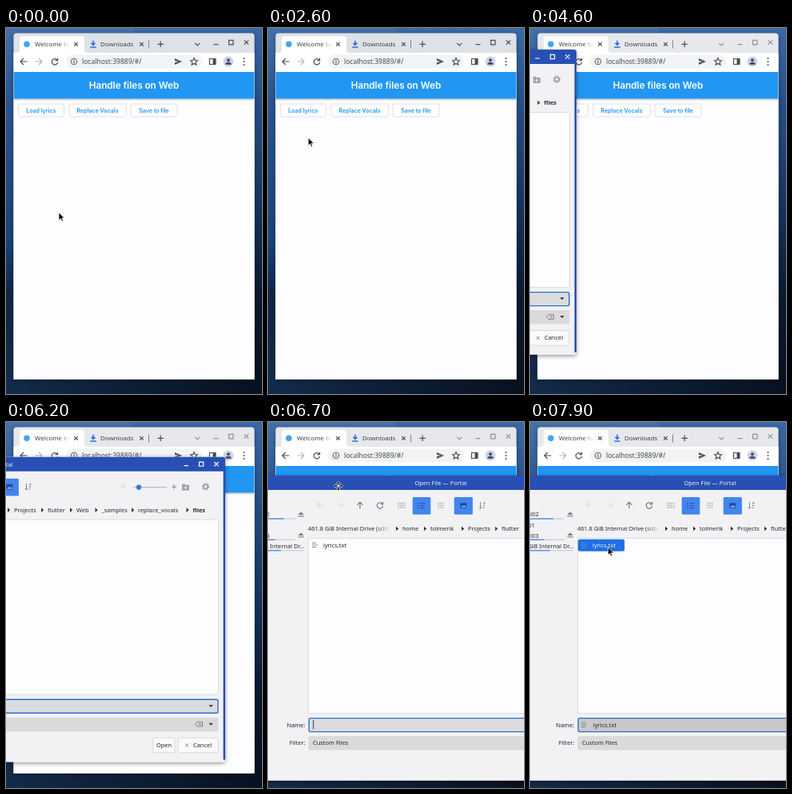
These frames come from a looping animation (320 by 458 pixels, 8000 ms). An HTML page:

```html
<!DOCTYPE html>
<html lang="en">
<head>
<meta charset="utf-8">
<title>Handle files on Web</title>
<style>
  html, body { margin: 0; width: 100%; height: 100%; overflow: hidden; background: #142c50; }
  svg { display: block; width: 100%; height: 100%; }
  text { font-family: "Noto Sans", sans-serif; font-size: 7.45px; fill: #26282c; white-space: pre; }
  .tab { font-size: 7.9px; fill: #3c4043; }
  .url { font-size: 8.5px; fill: #45494d; }
  .app { font-family: Inter, Roboto, sans-serif; text-anchor: middle; }
  .head { font-size: 11.7px; font-weight: 600; fill: #fff; }
  .btn { font-size: 7.05px; font-weight: 600; fill: #2196f3; }
  .end { text-anchor: end; }
  .mid { text-anchor: middle; }
  .line { fill: none; stroke: #4a4d52; stroke-width: 1.2; }
  .thin { fill: none; stroke: #77797d; stroke-width: .9; }
</style>
</head>
<body>
<svg id="stage" viewBox="0 0 320 458" preserveAspectRatio="none"></svg>
<script>
const LOOP = 8000, STEP = 100;

const rect = (x, y, w, h, fill, rx = 0, more = '') =>
  `<rect x="${x}" y="${y}" width="${w}" height="${h}" rx="${rx}" fill="${fill}" ${more}/>`;
const text = (x, y, s, cls = '', more = '') => `<text x="${x}" y="${y}" class="${cls}" ${more}>${s}</text>`;
const path = (d, cls = 'line', more = '') => `<path d="${d}" class="${cls}" ${more}/>`;
const solid = (d, fill) => `<path d="${d}" fill="${fill}"/>`;
const dot = (x, y, r, fill, more = '') => `<circle cx="${x}" cy="${y}" r="${r}" fill="${fill}" ${more}/>`;
const cross = (x, y, r) => `M${x - r} ${y - r}l${2 * r} ${2 * r}m0 ${-2 * r}l${-2 * r} ${2 * r}`;
const reload = (x, y) => `M${x + 3} ${y - 2}A3.7 3.7 0 1 0 ${x + 3.7} ${y + .8}M${x + 3.6} ${y - 4.3}v3h-3`;
const fade = (id, color) => `<linearGradient id="${id}"><stop stop-color="${color}" stop-opacity="0"/>
  <stop offset="1" stop-color="${color}"/></linearGradient>`;

const defs = `<defs>
  <linearGradient id="wallL" x2="0" y2="1">
    <stop stop-color="#4371a8"/><stop offset=".2" stop-color="#295590"/><stop offset=".6" stop-color="#1b437a"/>
    <stop offset=".76" stop-color="#0f2446"/><stop offset="1" stop-color="#132b4b"/>
  </linearGradient>
  <linearGradient id="wallR" x2="0" y2="1">
    <stop stop-color="#3a69a5"/><stop offset=".2" stop-color="#265088"/><stop offset=".5" stop-color="#16345f"/>
    <stop offset=".75" stop-color="#0b1a32"/><stop offset="1" stop-color="#081120"/>
  </linearGradient>
  <linearGradient id="wallB"><stop stop-color="#132b4b"/><stop offset="1" stop-color="#081120"/></linearGradient>
  ${fade('tabFade', '#fff')}${fade('crumbFade', '#f2f2f5')}
  <filter id="soft" x="-10%" y="-10%" width="120%" height="120%">
    <feDropShadow dx="0" dy="1.5" stdDeviation="2.5" flood-color="#000" flood-opacity=".45"/>
  </filter>
  <filter id="barSoft" x="-5%" y="-20%" width="110%" height="150%">
    <feDropShadow dx="0" dy="1" stdDeviation="1.1" flood-color="#000" flood-opacity=".4"/>
  </filter>
  <clipPath id="btnClip">${rect(15.5, 95, 57, 16, '#000', 2.5)}</clipPath>
  <clipPath id="page">${rect(9.5, 55, 301, 384.6, '#000')}</clipPath>
</defs>`;

const wall = rect(0, 0, 320, 458, 'url(#wallB)') + rect(0, 0, 160, 440, 'url(#wallL)') +
  rect(160, 0, 160, 440, 'url(#wallR)');

const button = (x, w, id = '') =>
  rect(x, 95, w, 16, '#fff', 2.5, `stroke="#dcdde2" stroke-width=".9" ${id && `id="${id}"`}`);

function browser() {
  const tools =
    path('M26.5 42h-8M22 38l-4 4l4 4') +
    path('M36.5 42h8M41 38l4 4l-4 4', 'line', 'style="stroke:#b4b7bb"') +
    path(reload(61, 42)) +
    rect(75, 33.5, 170, 17, '#f1f3f4', 8.5) +
    dot(85, 42, 3.8, 'none', 'stroke="#5f6368"') + path('M85 41.3v2.8M85 39.6v.9') +
    text(95, 45.1, 'localhost:39889/#/', 'url') +
    solid('M211 38l9 4l-9 4v-3l5-1l-5-1z', '#4f5358') +
    path('M235 37.6l1.3 2.9l3.1.3l-2.3 2.1l.7 3.1l-2.8-1.6l-2.8 1.6l.7-3.1l-2.3-2.1l3.1-.3z') +
    path('M254.5 38.5h7.5v7h-7.5z') + rect(258.5, 38.5, 3.5, 7, '#4a4d52') +
    dot(278, 42, 6.4, '#cdd3e3') + dot(278, 40.2, 1.9, '#3d4b68') +
    solid('M274.2 45.8q0-3 3.8-3t3.8 3z', '#3d4b68') +
    [38, 42, 46].map(y => dot(297.5, y, 1, '#4a4d52')).join('');

  const tabs =
    solid('M13 31q4 0 4-4v-13q0-4 4-4h73q4 0 4 4v13q0 4 4 4z', '#fff') +
    dot(26, 20.3, 3.8, '#42a5f5') +
    text(36, 23.4, 'Welcome to', 'tab') + rect(66, 12, 14, 16, 'url(#tabFade)') +
    path(cross(87.5, 20.3, 2.2)) +
    path('M109 15.8v5M106.5 18.8l2.5 2.6l2.5-2.6M105.3 24h7.4', 'line', 'style="stroke:#2f6fd6;stroke-width:1.6"') +
    text(118, 23.4, 'Downloads', 'tab') +
    path(cross(169.5, 20.3, 2.2)) +
    path('M178.5 15.5v10', 'thin') + path('M189.5 20.3h7.4m-3.7-3.7v7.4');

  const controls = `<g id="controls">` + path('M236.3 18.8l3 3l3-3') + path('M259.5 20.6h6') +
    path('M278.6 15.4h5.4v5.4h-5.4z') + path(cross(300.5, 18, 2.7)) + '</g>';

  const pageArea =
    rect(9.5, 55, 301, 384.6, '#fdfcff') +
    `<g clip-path="url(#page)">${rect(9.5, 54, 301, 34.3, '#2196f3', 0, 'filter="url(#barSoft)"')}</g>` +
    text(160, 76.2, 'Handle files on Web', 'app head') +
    button(15.5, 57, 'load') +
    `<g clip-path="url(#btnClip)">${dot(42, 104, 0, '#9fd0f8', 'id="ripple"')}</g>` +
    button(79, 71.5) + button(156, 58) +
    text(43.8, 105.6, 'Load lyrics', 'app btn') +
    text(114.6, 105.6, 'Replace Vocals', 'app btn') +
    text(185, 105.6, 'Save to file', 'app btn');

  return `<g filter="url(#soft)"><path id="strip" d="M9.5 439.6V10.5q0-4 4-4h293q4 0 4 4v429.1z"/></g>` +
    tabs + controls + rect(9.5, 31, 301, 24, '#fff') + tools + pageArea;
}

const lines = (x, y, more = '') => path(`M${x} ${y - 2.7}h5M${x} ${y}h7M${x} ${y + 2.7}h5`, 'thin', more);
const dots = (x, y, cols, color) => {
  let s = '';
  for (let r = -1; r < 2; r++)
    for (let c = 0; c < cols; c++) s += rect(x + (c - cols / 2) * 2.7, y + r * 2.8 - .7, 1.5, 1.4, color);
  return s;
};
const eject = y => solid(`M37.5 ${y}l3.7-3.6l3.7 3.6z`, '#77797d') + rect(37.5, y + 1.3, 7.4, 1.1, '#77797d');
const usage = (y, used, end) => rect(-66, y, end + 66, 1.2, '#c9cacf') + rect(-66, y, used + 66, 1.2, '#3f86ea');

function dialog() {
  const title =
    solid('M-81 85V70q0-3 3-3h589q3 0 3 3v15z', '#2850b4') +
    text(216, 78.9, 'Open File — Portal', 'mid', 'style="fill:#e9edf8"') +
    path('M462.5 78h5.5M481.5 73.4h5.2v5.2h-5.2z' + cross(503, 76, 2.7), 'line', 'style="stroke:#fff"');

  const pale = 'style="stroke:#dcdde1"', blue = '#4285ee', ink = '#234c9c';
  const bar =
    path('M69 104h-7.5m3.7-3.7l-3.7 3.7l3.7 3.7M86.5 104h7.5m-3.7-3.7l3.7 3.7l-3.7 3.7', 'line', pale) +
    path('M115 108.3v-8m-3.6 3.6l3.6-3.6l3.6 3.6', 'line', 'style="stroke:#77797d"') +
    path(reload(140, 104.3), 'line', 'style="stroke:#77797d"') +
    dots(167.5, 104.3, 4, '#a2a4a8') +
    rect(180.7, 94, 22.6, 21.8, blue, 1.5) +
    path('M190 101.8h6m-6 2.8h6m-6 2.8h6', 'thin', `style="stroke:${ink}"`) +
    [101.8, 104.6, 107.4].map(y => rect(187, y - .6, 1.4, 1.2, ink)).join('') +
    dots(216.5, 104.3, 3, '#a2a4a8') +
    rect(232.7, 94, 23.2, 21.8, blue, 1.5) + rect(240.3, 101.2, 8, 6.8, ink, .8) +
    solid('M241.2 107l2.2-2.7l1.6 1.4l1.3-1.6l1.4 2.9z', '#7fb0ff') +
    path('M265.5 100.3v8m-1.6-1.8l1.6 1.8l1.6-1.8', 'thin') +
    [101, 104, 107].map((y, i) => rect(269, y - .3, 2.6 - i * .6, 1.4, '#85878b')).join('') +
    dot(386, 104, 3, '#e4e4e8') + path('M384.5 104h3', 'thin', pale) +
    rect(399, 104.4, 42, 1.2, '#b8bac0') + dot(406, 105, 3.1, '#2f78e6') +
    path('M447 104.5h6m-3-3v6', 'thin') +
    solid('M460 101h3.6l1 1h4.4v7h-9z', '#a2a4a8') + path('M464.5 103.5v4m-2-2h4', 'thin', 'style="stroke:#f2f2f5"') +
    dot(489.5, 104.3, 2.7, 'none', 'stroke="#a2a4a8" stroke-width="1.8"') +
    dot(489.5, 104.3, 4, 'none', 'stroke="#a2a4a8" stroke-width="1.4" stroke-dasharray="1.6 1.54"');

  const crumbs = [[168, 'home'], [203, 'tolmerik'], [250, 'Projects'], [292, 'flutter'],
    [328, 'Web'], [359.5, '_samples'], [405, 'replace_vocals'], [473.5, 'files']];
  const places =
    text(50, 136.3, '461.8 GiB Internal Drive (sdb1)') + rect(134, 127, 20, 13, 'url(#crumbFade)') +
    rect(154, 127, 8, 13, '#f2f2f5') +
    crumbs.map(([x, s]) => solid(`M${x - 8} 130.7l3.2 2.8l-3.2 2.8z`, '#303236') +
      text(x, 136.3, s, '', s === 'files' ? 'font-weight="600"' : '')).join('');

  const side =
    text(2, 118.3, 'Vol02', 'end') + usage(120.5, 20, 34) + eject(116) +
    text(-3, 131.7, 'Vol01', 'end') +
    text(2, 144.8, 'Vol03', 'end') + usage(146.7, 9, 34) + eject(142) +
    text(45.5, 158, '461.8 GiB Internal Dr...', 'end') + usage(160.2, 16, 45);

  const list =
    rect(50.5, 145.5, 455, 219, '#fdfcff', 1.5, 'stroke="#d6d6db" stroke-width=".8"') +
    rect(51, 146.7, 58.2, 15.1, 'none', 2.5, 'id="row"') + lines(55, 154, 'id="fileIcon"') +
    text(69, 156.9, 'lyrics.txt', '', 'id="file"');

  const chevron = y => solid(`M493.3 ${y - 1.4}h5.6l-2.8 3z`, '#3a3c40');
  const form =
    text(46.5, 381.6, 'Name:', 'end') + text(46.5, 404.4, 'Filter:', 'end') +
    rect(51.2, 370.6, 453.8, 17, '#dcdcde', 2, 'id="name" stroke="#2a6fcc" stroke-width="1.4"') +
    rect(56.3, 373, .9, 11.5, '#26282c', 0, 'id="caret"') +
    `<g id="picked">${lines(55, 378.8)}${text(70, 381.6, 'lyrics.txt')}</g>` +
    rect(50.5, 393, 455, 17.5, '#dadadc', 2) + text(56, 404.4, 'Custom Files') +
    chevron(378.7) + chevron(401.5) +
    path('M476.5 401.5l2.6-2.8h6.4v5.6h-6.4z' + cross(482.3, 401.5, 1.2), 'thin') +
    [[424, 27], [455, 50]].map(([x, w]) =>
      rect(x, 418.5, w, 18.5, '#fafafc', 2, 'stroke="#d3d3d8" stroke-width=".8"')).join('') +
    text(437.5, 430.4, 'Open', 'mid') + path(cross(466, 427.8, 2), 'thin') + text(474, 430.4, 'Cancel');

  return `<g id="dialog"><g filter="url(#soft)">` + rect(-81, 67, 595, 381.8, '#f2f2f5', 3) + '</g>' +
    title + rect(511.6, 80, 2.4, 366, '#2850b4', 1) + bar + places + side + list + form + '</g>';
}

const cursors =
  `<path id="arrow" d="M0 0v9.6l2.3-2.1l1.6 3.5l1.6-.8l-1.6-3.3l3.1-.2z" fill="#000" stroke="#fff" stroke-width=".7"/>
  <path id="hand" d="M-.9 .8q.9-1.6 1.8 0v2.5l3 .5q.9.3.7 1.4l-.6 3.2v1.6h-5.2v-1.4l-2.5-3.2q-.2-1.5 1.3-.9l1.5 1z" fill="#000" stroke="#fff" stroke-width=".5"/>
  <g id="move"><path d="M0-6l2.2 2.4h-1.3v2.7h2.7v-1.3l2.4 2.2l-2.4 2.2v-1.3h-2.7v2.7h1.3l-2.2 2.4l-2.2-2.4h1.3v-2.7h-2.7v1.3l-2.4-2.2l2.4-2.2v1.3h2.7v-2.7h-1.3z" fill="#000" stroke="#fff" stroke-width=".6"/>
  <circle r="1.3" fill="#fff"/></g>`;

const stage = document.getElementById('stage');
stage.innerHTML = defs + wall + browser() + dialog() + cursors;

const $ = id => document.getElementById(id);
const set = (id, attrs) => { for (const k in attrs) $(id).setAttribute(k, attrs[k]); };
const clamp = v => Math.max(0, Math.min(1, v));

// Linear walk through [time, x, y] stops.
function along(stops, t) {
  let i = 1;
  while (i < stops.length - 1 && stops[i][0] < t) i++;
  const a = stops[i - 1], b = stops[i], p = clamp((t - a[0]) / (b[0] - a[0]));
  return [a[1] + (b[1] - a[1]) * p, a[2] + (b[2] - a[2]) * p];
}

const DRAG = [[5900, -456, -40], [6100, -320, -30], [6250, -200, -20], [6400, -101, -9.6],
  [6550, -36, -3], [6700, 0, 0], [6800, 9, 0]];
const POINTER = [[1600, 66, 231], [1700, 66, 231], [2000, 65, 214], [2500, 52, 146], [2900, 45, 112],
  [3400, 43, 105.5], [4300, 43, 105.5], [4600, -20, 140], [5900, -368, 40], [6400, -2, 70],
  [6700, 88, 80], [6800, 97, 80], [6900, 96, 84], [7300, 94, 130], [7600, 97.5, 157]];

function draw(t) {
  const open = t >= 4000;
  const [dx, dy] = along(DRAG, t);
  const [px, py] = along(POINTER, t);

  set('strip', { fill: open ? '#e6e8ec' : '#dee1e6' });
  set('controls', { opacity: open ? .55 : 1 });

  const over = !open && py < 111, pressed = over && t >= 3400;
  set('load', { fill: pressed ? '#e0f0fd' : over ? '#f1f8fe' : '#fff', stroke: pressed ? '#c3d9ee' : '#dcdde2' });
  const age = t - 3300;
  set('ripple', { r: age > 0 ? 9 + age * .045 : 0, opacity: age > 0 ? .65 * clamp(1 - (age - 200) / 450) : 0 });

  set('dialog', {
    transform: `translate(${dx} ${dy})`,
    opacity: t < 4000 ? 0 : t < 4100 ? .4 : t < 4200 ? .85 : 1
  });
  const picked = t >= 7800, hover = t >= 7500;
  set('row', { fill: picked ? '#1f6fe5' : hover ? '#cfe1fa' : 'none' });
  $('file').style.fill = picked ? '#eef4ff' : '#26282c';
  $('fileIcon').style.stroke = picked ? '#6f93c8' : '#77797d';
  set('name', { fill: picked ? '#c8c8ca' : '#dcdcde' });
  set('picked', { opacity: picked ? 1 : 0 });
  set('caret', { opacity: picked ? 0 : 1 });

  const shape = t >= 5900 && t < 6900 ? 'move' : over ? 'hand' : 'arrow';
  for (const id of ['arrow', 'hand', 'move'])
    set(id, { transform: `translate(${px} ${py})`, visibility: id === shape ? 'visible' : 'hidden' });
}

const start = performance.now();
function tick() {
  const t = (performance.now() - start) % LOOP;
  draw(Math.floor(t / STEP) * STEP);
  requestAnimationFrame(tick);
}
tick();
</script>
</body>
</html>
```
